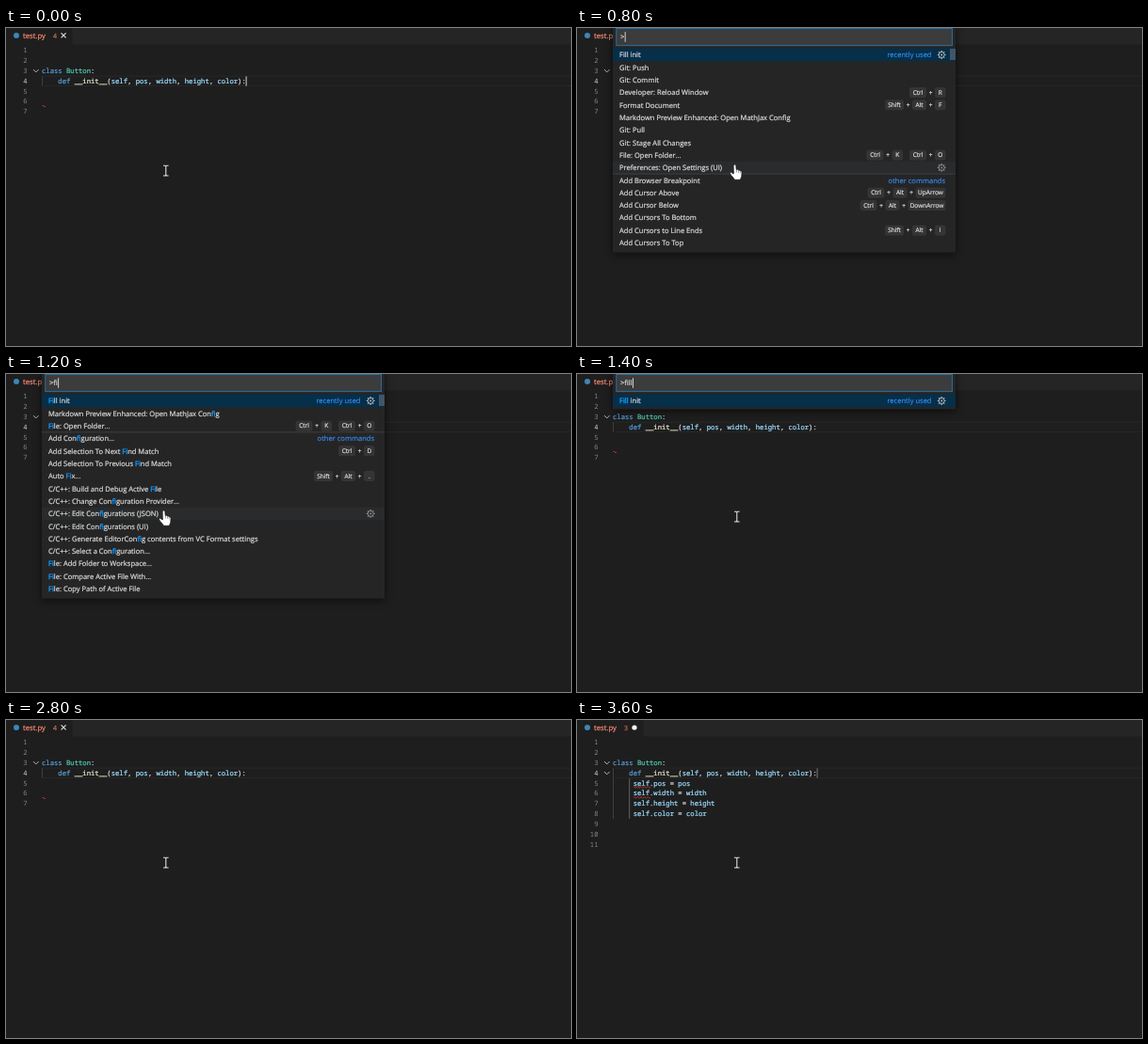
Animation of 600x338 px, one loop 3800 ms. Source, as an HTML page:

```html
<!DOCTYPE html>
<html lang="en">
<head>
<meta charset="utf-8">
<title>Fill init</title>
<style>
html, body { margin: 0; width: 100%; height: 100%; overflow: hidden; background: #1e1e1e; }
svg { display: block; width: 100vw; height: 100vh; }
text { white-space: pre; text-rendering: geometricPrecision; }
text, tspan { fill: currentColor; stroke: currentColor; stroke-width: .22px; }
.code { font: 7.23px "Noto Sans Mono", monospace; color: #dcdcdc; }
.ui { font: 7.56px "Open Sans", sans-serif; color: #d8d8d8; }
.key { font-size: 6.5px; text-anchor: middle; }
.num { text-anchor: end; color: #858585; stroke-width: 0; }
.active { color: #d0d0d0; }
.file { font-size: 7.7px; color: #f48771; }
.count { font-size: 7px; color: #c26a5c; }
.kw { color: #569cd6; } .cls { color: #4ec9b0; } .fn { color: #e4e4cc; } .var { color: #9cdcfe; }
.hit { color: #1595f2; stroke-width: .4px; }
.note { color: #3794ff; text-anchor: end; stroke-width: .1px; }
.wave { fill: none; stroke: #e0473f; stroke-width: .8; }
.panel { filter: drop-shadow(0 2px 4px rgba(0, 0, 0, .6)); }
</style>
</head>
<body>
<svg id="stage" viewBox="0 0 600 338" xmlns="http://www.w3.org/2000/svg"></svg>
<script>
const LOOP = 3800, LEFT = 38, COL = 4.34, LINE = 10.9, ROW = 13.33;
const stage = document.getElementById('stage');
const pen = document.createElement('canvas').getContext('2d');
pen.font = '7.56px "Open Sans", sans-serif';

const COMMANDS = {
  '': { split: 10, rows: [
    'Fill init', 'Git: Push', 'Git: Commit', 'Developer: Reload Window|Ctrl+R',
    'Format Document|Shift+Alt+F', 'Markdown Preview Enhanced: Open MathJax Config',
    'Git: Pull', 'Git: Stage All Changes', 'File: Open Folder...|Ctrl+K Ctrl+O',
    'Preferences: Open Settings (UI)', 'Add Browser Breakpoint',
    'Add Cursor Above|Ctrl+Alt+UpArrow', 'Add Cursor Below|Ctrl+Alt+DownArrow',
    'Add Cursors To Bottom', 'Add Cursors to Line Ends|Shift+Alt+I', 'Add Cursors To Top'] },
  f: { split: 5, rows: [
    'Fill init', 'Format Document|Shift+Alt+F', 'Markdown Preview Enhanced: Open MathJax Config',
    'File: Open Folder...|Ctrl+K Ctrl+O', 'Preferences: Open Settings (UI)',
    'Add Function Breakpoint', 'Add Selection To Next Find Match|Ctrl+D',
    'Add Selection To Previous Find Match', 'Auto Fix...|Shift+Alt+.',
    'C/C++: Build and Debug Active File', 'C/C++: Change Configuration Provider...',
    'C/C++: Edit Configurations (JSON)', 'C/C++: Edit Configurations (UI)',
    'C/C++: Generate EditorConfig contents from VC Format settings',
    'C/C++: Select a Configuration...',
    'C/C++: Toggle IntelliSense Engine Fallback on Include Errors'] },
  fi: { split: 3, rows: [
    'Fill init', 'Markdown Preview Enhanced: Open MathJax Config',
    'File: Open Folder...|Ctrl+K Ctrl+O', 'Add Configuration...',
    'Add Selection To Next Find Match|Ctrl+D', 'Add Selection To Previous Find Match',
    'Auto Fix...|Shift+Alt+.', 'C/C++: Build and Debug Active File',
    'C/C++: Change Configuration Provider...', 'C/C++: Edit Configurations (JSON)',
    'C/C++: Edit Configurations (UI)',
    'C/C++: Generate EditorConfig contents from VC Format settings',
    'C/C++: Select a Configuration...', 'File: Add Folder to Workspace...',
    'File: Compare Active File With...', 'File: Copy Path of Active File'] },
};
const KEY_WIDTH = { Ctrl: 17, Shift: 19, Alt: 14, UpArrow: 31, DownArrow: 39 };

const rect = (x, y, w, h, fill, more = '') =>
  `<rect x="${x}" y="${y}" width="${w}" height="${h}" fill="${fill}" ${more}/>`;
const path = (d, stroke, width = 1, fill = 'none') =>
  `<path d="${d}" stroke="${stroke}" stroke-width="${width}" fill="${fill}"/>`;
const text = (x, y, cls, body) => `<text x="${x}" y="${y}" class="${cls}">${body}</text>`;
const span = (cls, body) => `<tspan class="${cls}">${body}</tspan>`;
const esc = s => s.replace('>', '&gt;');
const lineY = n => 23.5 + (n - 1) * LINE;
const code = (n, col, body) => text(LEFT + col * COL, lineY(n) + 2.4, 'code', body);

const chevron = n => path(`M29 ${lineY(n) - 1.2}l2.8 2.8l2.8-2.8`, '#c5c5c5', .9);

function wave(x, y, w) {
  let d = `M${x} ${y}`;
  for (let i = 0; i < w / 3.6; i++) d += 'q.9-1.8 1.8 0t1.8 0';
  return `<path class="wave" d="${d}"/>`;
}

function gear(x, y, color) {
  let teeth = '';
  for (let i = 0; i < 8; i++) {
    const a = i * Math.PI / 4, c = Math.cos(a), s = Math.sin(a);
    teeth += `M${x + 3 * c} ${y + 3 * s}L${x + 4.4 * c} ${y + 4.4 * s}`;
  }
  return path(teeth, color, 1.2) +
    `<circle cx="${x}" cy="${y}" r="3" fill="none" stroke="${color}"/>` +
    `<circle cx="${x}" cy="${y}" r="1" fill="${color}"/>`;
}

function tab(t) {
  const mark = t >= 3000
    ? '<circle cx="61" cy="8" r="2.6" fill="#fff"/>'
    : path('M58.6 5.4l5 5m0-5l-5 5', '#e8e8e8', 1.1);
  return rect(0, 0, 600, 17.5, '#252526') + rect(0, 0, 70.5, 18, '#1e1e1e') +
    '<circle cx="11" cy="8" r="3" fill="#3d85b8"/>' +
    text(18, 10.6, 'ui file', 'test.py') +
    text(50, 10.6, 'ui count', t >= 3400 ? 3 : 4) + mark;
}

function editor(t) {
  const filled = t >= 3000, checked = t >= 3200, flagged = t >= 3400;
  let s = path('M40 51.2H600M40 61.6H600', '#272727');
  for (let n = 1; n <= (filled ? 11 : 7); n++)
    s += text(22.5, lineY(n) + 2.4, n === 4 ? 'code num active' : 'code num', n);
  s += chevron(3) + (checked ? chevron(4) : '');
  s += path(`M38.5 51V${filled ? 105 : 61.5}`, '#484848', .8);

  const args = ['self', 'pos', 'width', 'height', 'color'];
  s += code(3, 0, span('kw', 'class') + ' ' + span('cls', 'Button') + ':');
  s += code(4, 4, span('kw', 'def') + ' ' + span('fn', '__init__') + '(' +
    args.map(a => span('var', a)).join(', ') + '):');

  if (filled) {
    s += path('M55.7 62V105', '#747474', .8);
    args.slice(1).forEach((a, i) => {
      s += code(5 + i, 5, span(checked ? 'var' : 'kw', 'self') + '.' +
        span('var', a) + ' = ' + span('var', a));
    });
  }
  if (flagged) s += wave(60, lineY(5) + 4.4, 17) + wave(60, lineY(6) + 4.4, 17);
  if (!checked) s += wave(38.5, lineY(filled ? 10 : 6) + 5, 3.6);

  const focus = t < 400 || t >= 3000 || (t >= 2600 && t < 2800);
  if (focus) s += rect(254.6, 51.4, 1, 10.2, '#d8d8d8', `opacity="${t >= 3600 ? .5 : 1}"`);
  return s;
}

// Key caps are laid out from the right edge.
function keys(combo, y) {
  let x = 391, s = '';
  combo.split(' ').reverse().forEach((chord, i) => {
    if (i) x -= 8;
    chord.split('+').reverse().forEach((k, j) => {
      if (j) {
        s += text(x - 5, y + 2.3, 'ui key', '+');
        x -= 10;
      }
      const w = KEY_WIDTH[k] || 10.5;
      x -= w;
      s += rect(x, y - 5, w, 10, '#343435', 'rx="1.5" stroke="#3d3d3e" stroke-width=".6"') +
        text(x + w / 2, y + 2.3, 'ui key', k);
    });
  });
  return s;
}

// Matches at a word start win over matches inside a word.
function highlight(label, query) {
  if (!query) return label;
  let at = label.search(new RegExp('\\b' + query, 'i'));
  if (at < 0) at = label.search(new RegExp(query, 'i'));
  if (at < 0) return label;
  const end = at + query.length;
  return label.slice(0, at) + span('hit', label.slice(at, end)) + label.slice(end);
}

function palette(query) {
  const { rows, split } = COMMANDS[query] || { rows: ['Fill init'], split: -1 };
  const long = rows.length > 1;
  let s = rect(LEFT, -4, 364, long ? 242.6 : 41.5, '#252526', 'class="panel"');
  s += rect(41.8, .4, 356.6, 18.3, '#3c3c3c', 'stroke="#2480bd" stroke-width=".8"');
  s += text(46, 12.2, 'ui', esc('>' + query));
  s += rect(46.4 + pen.measureText('>' + query).width, 4.2, .9, 10.6, '#e0e0e0');
  rows.forEach((row, i) => {
    const [label, combo] = row.split('|'), y = 28.5 + i * ROW, top = y - ROW / 2;
    const first = i === 0, hover = i === 9;
    if (first) s += rect(LEFT, top, 364, ROW, '#062f4a');
    if (hover) s += rect(LEFT, top, 364, ROW, '#292b2c');
    if (i === split) s += path(`M38 ${top}H402`, '#46464a', .8);
    s += text(45, y + 2.7, 'ui', highlight(label, query));
    if (first) s += text(376.5, y + 2.7, 'ui note', 'recently used');
    if (i === split) s += text(391, y + 2.7, 'ui note', 'other commands');
    if (first || hover) s += gear(387.2, y, first ? '#b8b8b8' : '#8c8c8c');
    if (combo) s += keys(combo, y);
  });
  if (long) s += rect(396, 22, 6, 12, '#3f566a');
  return s;
}

const ibeam = () =>
  path('M167 146.2h2l.8.7l.8-.7h2M169.8 146.5v10.2M167 157h2l.8-.7l.8.7h2', '#dedede', 1.1);
const hand = () => '<g transform="translate(163.2 144.4) scale(1.12)">' +
  path('M2.6 1.2q1.6-1.6 2.4.3l.4 4q1.2-.7 1.9.5q1.2-.5 1.7.7q1.6-.3 1.6 1.4' +
    'q.2 4-1.5 7h-5.3q-1.5-2.5-3.6-4.6q-1.6-2 .1-2.5l2.5 1.4z', '#1a1a1a', .7, '#fff') +
  path('M5.6 5.6v2.6M7.4 6.2v2.2M9 7v2', '#555', .5) + '</g>';

// The typed query over time; null while the palette is closed.
function queryAt(t) {
  if (t < 400 || t >= 2600) return null;
  if (t < 1000) return '';
  if (t < 1200) return 'f';
  if (t < 1400) return 'fi';
  if (t < 2000) return 'fill';
  return t < 2200 ? 'fill i' : 'fill init';
}

let shown;
function draw(t) {
  const step = Math.floor(t / 200) * 200;
  if (step === shown) return;
  shown = step;
  const query = queryAt(step);
  stage.innerHTML = rect(0, 0, 600, 338, '#1e1e1e') + tab(step) + editor(step) +
    (query === null ? '' : palette(query)) +
    (query !== null && query in COMMANDS ? hand() : ibeam());
}

const start = performance.now();
function tick() {
  draw((performance.now() - start) % LOOP);
  requestAnimationFrame(tick);
}
tick();
</script>
</body>
</html>
```
